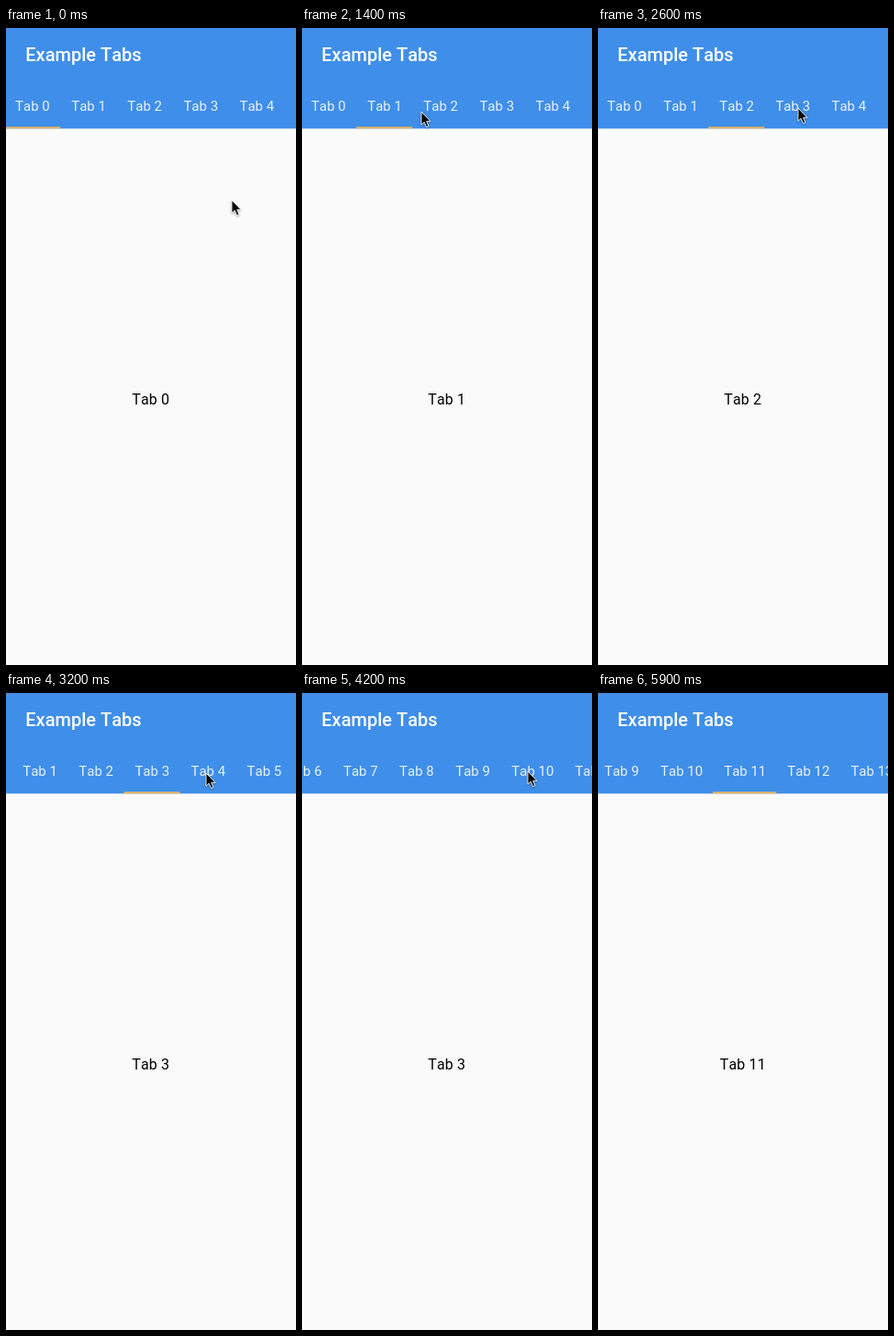
Animation, 316 px wide and 692 px high, one loop 6000 ms. Source, as an HTML page:

```html
<!DOCTYPE html>
<html lang="en">
<head>
<meta charset="utf-8">
<title>Example Tabs</title>
<style>
  html, body { margin: 0; width: 100%; height: 100%; overflow: hidden; background: #fafafa; }
  svg { display: block; font-family: Roboto, sans-serif; font-kerning: none; }
  #title { font-size: 20px; font-weight: 500; fill: #fff; }
  #tabs text { font-size: 15px; fill: rgba(255, 255, 255, .88); }
  .page { font-size: 16px; letter-spacing: .15px; text-anchor: middle; fill: #000; }
  #cursor { filter: drop-shadow(0 1px 1px rgba(0, 0, 0, .35)); }
</style>
</head>
<body>
<svg width="316" height="692" viewBox="0 0 316 692">
  <rect width="316" height="692" fill="#fafafa"/>
  <text class="page" id="oldPage" y="409"></text>
  <text class="page" id="newPage" y="409"></text>
  <rect width="316" height="109.3" fill="#3f8ee9"/>
  <text id="title" x="21.3" y="36">Example Tabs</text>
  <g id="tabs"><rect id="indicator" y="107.3" height="2" fill="#e8b75c"/></g>
  <path id="cursor" d="M0 0V14.2L3.2 11.2L5.6 16.6L8 15.6L5.7 10.3H10Z"
        fill="#000" stroke="#fff" stroke-width=".9"/>
</svg>
<script>
const LOOP = 6000, STEP = 100, WIDTH = 316, CENTER = 157.8, SLIDE = 200;
const TAB = 61.1, WIDE_TAB = 69.1, FIRST_TAB = -1.9, PADDING = 12;
const [oldPage, newPage, tabs, indicator, cursor] =
  ['oldPage', 'newPage', 'tabs', 'indicator', 'cursor'].map(id => document.getElementById(id));

// Page changes: start of the slide, time the indicator follows, tab opened, bar scroll afterwards
const changes = [
  { start: 736, marked: 950, tab: 1, scroll: 0 },
  { start: 1822, marked: 2050, tab: 2, scroll: 0 },
  { start: 2888, marked: 3150, tab: 3, scroll: 53 },
  { start: 4775, marked: 5050, tab: 11, scroll: 553 },
];
const flick = { start: 3420, end: 3900, scroll: 392.8 };

// Pointer path: time, x, y
const pointer = [
  [0, 246, 187], [600, 100, 91], [1100, 100, 91], [1600, 150, 91],
  [2100, 150, 91], [2500, 212, 83], [2600, 218, 87], [4100, 218, 87],
  [4200, 246, 85], [4600, 300, 82], [5600, 300, 82], [5900, 320, 70],
];

const tabWidth = i => i < 10 ? TAB : WIDE_TAB;
const tabStart = i => FIRST_TAB + TAB * Math.min(i, 10) + WIDE_TAB * Math.max(0, i - 10);
const clamp = v => Math.min(1, Math.max(0, v));
const mix = (a, b, p) => a + (b - a) * p;

// CSS "ease": cubic-bezier(.25, .1, .25, 1)
function ease(x) {
  const bezier = (a, b, u) => 3 * a * u * (1 - u) ** 2 + 3 * b * u * u * (1 - u) + u ** 3;
  let low = 0, high = 1;
  for (let i = 0; i < 24; i++) {
    const mid = (low + high) / 2;
    if (bezier(.25, .25, mid) < x) low = mid; else high = mid;
  }
  return bezier(.1, 1, high);
}

for (let i = 0; i < 15; i++) {
  const label = document.createElementNS('http://www.w3.org/2000/svg', 'text');
  label.textContent = 'Tab ' + i;
  label.setAttribute('x', tabStart(i) + PADDING);
  label.setAttribute('y', 90);
  tabs.append(label);
}

function pointerAt(t) {
  const next = pointer.findIndex(([time]) => time > t);
  if (next < 0) return [400, 70];
  const [t0, x0, y0] = pointer[next - 1], [t1, x1, y1] = pointer[next];
  const p = (t - t0) / (t1 - t0);
  return [mix(x0, x1, p), mix(y0, y1, p)];
}

function showPage(node, tab, x) {
  node.textContent = 'Tab ' + tab;
  node.setAttribute('x', x);
}

function draw(t) {
  let from = 0, to = 0, slide = 1, scroll = 0, marked = 0;
  for (const change of changes) {
    if (change.start > flick.end) {
      const p = clamp((t - flick.start) / (flick.end - flick.start));
      scroll = mix(scroll, flick.scroll, 1 - (1 - p) ** 2);
    }
    if (t < change.start) continue;
    from = to;
    to = change.tab;
    slide = ease(clamp((t - change.start) / SLIDE));
    scroll = mix(scroll, change.scroll, slide);
    if (t >= change.marked) marked = to;
  }
  showPage(oldPage, from, CENTER - WIDTH * slide);
  showPage(newPage, to, CENTER + WIDTH * (1 - slide));
  indicator.setAttribute('x', tabStart(marked));
  indicator.setAttribute('width', tabWidth(marked));
  tabs.setAttribute('transform', `translate(${-scroll} 0)`);
  cursor.setAttribute('transform', `translate(${pointerAt(t)})`);
}

const begin = performance.now();
function tick() {
  const t = (performance.now() - begin) % LOOP;
  draw(Math.floor(t / STEP) * STEP);
  requestAnimationFrame(tick);
}
tick();
</script>
</body>
</html>
```
